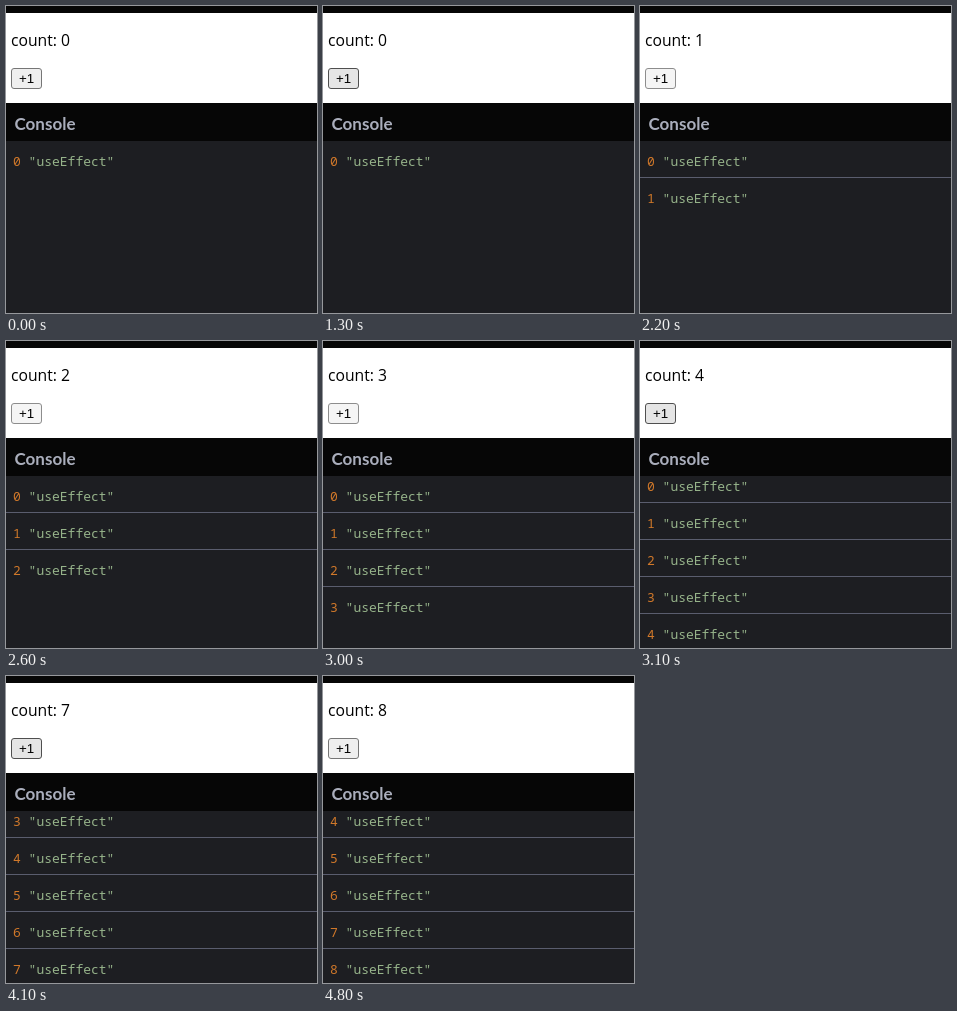
An HTML page for the animation above (5500 ms loop, 311 by 307 pixels).

```html
<!DOCTYPE html>
<html lang="en">
<head>
<meta charset="utf-8">
<title>Counter and console</title>
<style>
  html, body { margin: 0; width: 100%; height: 100%; overflow: hidden; background: #fff; }
  svg { display: block; width: 311px; height: 307px; }
  text { white-space: pre; }
  .count { font: 15.7px "Open Sans", "Noto Sans", sans-serif; }
  .label { font: 13.333px "Liberation Sans", Arial, sans-serif; }
  .title { font: 700 17px Lato, sans-serif; fill: #aaaebc; }
  .log { font: 13px "Noto Sans Mono", "DejaVu Sans Mono", monospace; fill: #96b38a; }
  .num { fill: #d0782a; }
</style>
</head>
<body>
<svg viewBox="0 0 311 307">
  <rect width="311" height="307" fill="#fff"/>
  <rect width="311" height="7" fill="#060606"/>
  <text class="count" x="5" y="40">count: <tspan id="count">0</tspan></text>
  <rect id="button" x="5.5" y="62.5" width="30" height="20" rx="2.5"/>
  <text class="label" x="13" y="77">+1</text>
  <rect y="97" width="311" height="210" fill="#1d1e22"/>
  <g id="rows"></g>
  <rect y="97" width="311" height="38" fill="#060606"/>
  <text class="title" x="8.5" y="124">Console</text>
</svg>
<script>
const LOOP = 5500, PITCH = 37, FIRST = 160, LAST = 298;
const $ = id => document.getElementById(id);

// Fill and border of the button
const LOOKS = {
  idle: ["#efefef", "#767676"],
  hover: ["#e5e5e5", "#4f4f4f"],
  down: ["#f5f5f5", "#8d8d8d"]
};

// [time, count, button look]
const steps = [[0, 0, "idle"], [1300, 0, "hover"], [1800, 1, "hover"]];
[2200, 2600, 3000, 3400, 3700, 4000, 4300].forEach((t, i) => {
  steps.push([t, i + 1, "down"], [t + 100, i + 2, "hover"]);
});
steps.push([4800, 8, "idle"]);

function row(n, y, line) {
  return `<text class="log" x="7" y="${y}"><tspan class="num">${n}</tspan> "useEffect"</text>` +
    (line ? `<rect y="${y + 11}" width="311" height="1" fill="#5a5d6e"/>` : "");
}

function draw([, count, look]) {
  const top = Math.min(FIRST, LAST - count * PITCH);
  let html = "";
  for (let n = Math.max(0, count - 4); n <= count; n++) {
    html += row(n, top + n * PITCH, n < count);
  }
  $("rows").innerHTML = html;
  $("count").textContent = count;
  const [fill, stroke] = LOOKS[look];
  $("button").setAttribute("fill", fill);
  $("button").setAttribute("stroke", stroke);
}

const start = performance.now();
let shown = null;

function tick(now) {
  const t = Math.max(0, now - start) % LOOP;
  const step = steps.filter(s => s[0] <= t).pop();
  if (step !== shown) draw(shown = step);
  requestAnimationFrame(tick);
}

tick(start);
</script>
</body>
</html>
```
